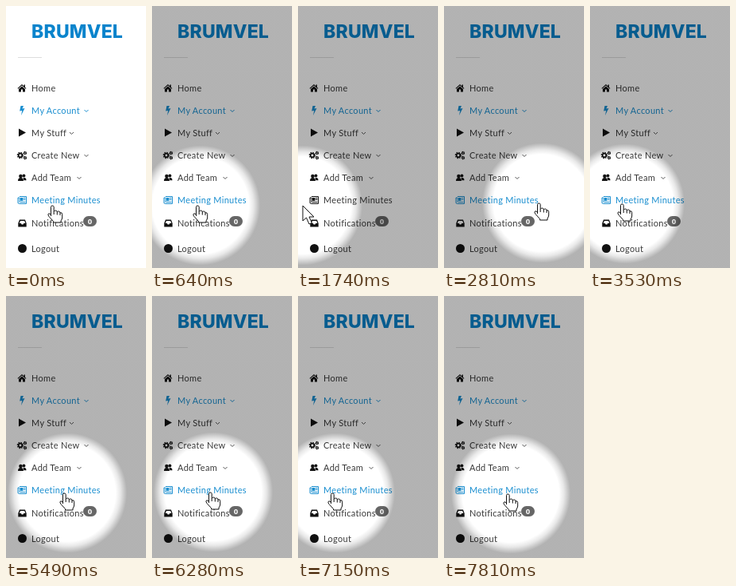
An HTML page that plays this animation: 176 by 328 pixels, repeating every 8 s.

```html
<!DOCTYPE html>
<html lang="en">
<head>
<meta charset="utf-8">
<title>Menu spotlight</title>
<style>
  html, body { margin: 0; width: 100%; height: 100%; overflow: hidden; background: #fff; }
  svg { display: block; width: 176px; height: 328px; }
  text { font: 11px Lato, sans-serif; letter-spacing: .3px; fill: #383838; }
  .brand { font: 800 23px Inter, sans-serif; letter-spacing: .2px; fill: #0a84cc; }
  .badge { font: bold 9.5px "Open Sans", sans-serif; letter-spacing: 0; fill: #fff; text-anchor: middle; }
  .icon { fill: #111; }
  .line { fill: none; stroke: #111; }
  .chev { fill: none; stroke: #555; }
  .on text, .on .icon { fill: #1b8fd0; }
  .on .line, .on .chev { stroke: #1b8fd0; }
  .cursor { fill: #fff; stroke: #111; stroke-linejoin: round; }
</style>
</head>
<body>
<svg viewBox="0 0 176 328">
  <defs>
    <radialGradient id="spot" gradientUnits="userSpaceOnUse" cx="0" cy="0" r="75">
      <stop offset=".81" stop-opacity="0"/>
      <stop offset=".89" stop-opacity=".09"/>
      <stop offset="1" stop-opacity=".3"/>
    </radialGradient>
    <path id="chev" d="M-2.5 -2L0 .5L2.5 -2"/>
  </defs>
  <rect width="176" height="328" fill="#fff"/>
  <text class="brand" x="32" y="40">BRUMVEL</text>
  <path d="M15 64.5H45" stroke="#ddd"/>

  <g>
    <path class="icon" d="M14.5 103L20 98l2.5 2.2V98.5H24v3.2l1.5 1.3-.7.8L20 99.6l-4.800 4.200zM16 104l4-3.500 4 3.500v3.500h-3v-3h-2v3h-3z"/>
    <text x="32" y="107">Home</text>
  </g>
  <g class="on">
    <path class="icon" d="M18.5 125H22l-1.500 3.500 3-.6-4.500 9 1.200-6-3 .7z"/>
    <text x="32" y="135">My Account</text>
    <use href="#chev" class="chev" x="101" y="132"/>
  </g>
  <g>
    <path class="icon" d="M16 153.500l9 5-9 5z"/>
    <text x="32" y="163">My Stuff</text>
    <use href="#chev" class="chev" x="82.5" y="160"/>
  </g>
  <g>
    <g class="line">
      <circle cx="18" cy="187" r="2.300" stroke-width="1.700"/>
      <circle cx="18" cy="187" r="3.700" stroke-width="1.200" stroke-dasharray="1.450"/>
      <circle cx="24" cy="184" r="1.400" stroke-width="1.600" stroke-dasharray="1.300 .3"/>
      <circle cx="24" cy="190" r="1.400" stroke-width="1.600" stroke-dasharray="1.300 .3"/>
    </g>
    <text x="32" y="191">Create New</text>
    <use href="#chev" class="chev" x="101" y="188"/>
  </g>
  <g>
    <g class="icon">
      <circle cx="18.500" cy="213" r="2.300"/>
      <circle cx="22.500" cy="212.500" r="1.900"/>
      <path d="M15 219q0-4 3.500-4t3.500 4zM21.500 215.200q4-1 4 3h-3z"/>
    </g>
    <text x="32" y="219">Add Team</text>
    <use href="#chev" class="chev" x="92" y="216"/>
  </g>
  <g id="minutes">
    <path class="line" d="M17 238.500H25.500V247.500H16.500Q15 247.500 15 246V240H17V246M22 240.500H24.500M22 242.500H24.500M18 245.500H24.500"/>
    <path class="icon" d="M18 240h3.500v4H18z"/>
    <text x="32" y="247">Meeting Minutes</text>
  </g>
  <g>
    <path class="icon" fill-rule="evenodd" d="M17 267.500h7l1.700 4.500v4.500H15.300V272zM18 269l-1.200 3h2l1 1.600h1.600l1-1.600h2l-1.200-3z"/>
    <text x="32" y="276">Notifications</text>
    <rect x="97" y="263" width="17" height="13" rx="6.500" fill="#666"/>
    <text class="badge" x="105.500" y="272.900">0</text>
  </g>
  <g>
    <circle class="icon" cx="20.500" cy="303.500" r="5.500"/>
    <text x="32" y="308">Logout</text>
  </g>

  <rect id="dim" width="176" height="328" fill="url(#spot)"/>
  <g id="hand" class="cursor">
    <path d="M-1.500 13V1.500Q-1.500 0 .3 0T2.200 1.500V7.500Q3 6 4.600 6T6.300 8Q7 7 8.400 7T10 9Q12.500 8 12.700 10.500V15Q12.500 17 11 19V21H1.500V19.500L-4 13.500Q-6 11 -4.500 10T-1.500 11.500Z"/>
    <path fill="none" d="M2.200 7.500V11M6.300 8V11.500M10 9V12"/>
  </g>
  <path id="arrow" class="cursor" d="M0 0V19L4.500 15L8 23L11.500 21.500L8 14H14Z"/>
</svg>
<script>
const LOOP = 8000, STEP = 130;

// Turning points of the pointer: [ms, position], eased in between
const pathX = [
  [0, 58], [1000, 56], [1740, 6], [2020, 11], [2600, 72], [2770, 119],
  [3000, 116], [3750, 25], [4550, 98], [5200, 32], [5620, 82],
  [5960, 38], [6530, 96], [6870, 42], [7150, 42], [7550, 80]
];
const pathY = [[0, 250], [1740, 250], [2770, 247], [4720, 249], [6280, 245.5], [7800, 248]];

const $ = id => document.getElementById(id);
const spot = $("spot"), dim = $("dim"), hand = $("hand"), arrow = $("arrow"), minutes = $("minutes");
const show = (el, on) => el.setAttribute("visibility", on ? "visible" : "hidden");
const move = (el, x, y, attr = "transform") => el.setAttribute(attr, `translate(${x} ${y})`);

function along(path, t) {
  const i = path.findIndex(p => p[0] > t);
  if (i < 0) return path.at(-1)[1];
  const [t0, a] = path[i - 1], [t1, b] = path[i];
  return a + (b - a) * (1 - Math.cos(Math.PI * (t - t0) / (t1 - t0))) / 2;
}

function draw(t) {
  // the pointer is sampled in steps, near the middle of each
  const sample = Math.floor(t / STEP) * STEP + 40;
  const x = Math.round(along(pathX, sample));
  const y = Math.round(along(pathY, sample));
  const over = x >= 14;
  move(hand, x, y);
  move(arrow, x, y);
  show(hand, over);
  show(arrow, !over);
  minutes.setAttribute("class", over ? "on" : "");
  move(spot, x + (over ? 4 : 0), y - .5, "gradientTransform");
  dim.setAttribute("opacity", t < 350 ? 0 : t < 480 ? .5 : 1);
}

function tick() {
  draw(performance.now() % LOOP);
  requestAnimationFrame(tick);
}
tick();
</script>
</body>
</html>
```
